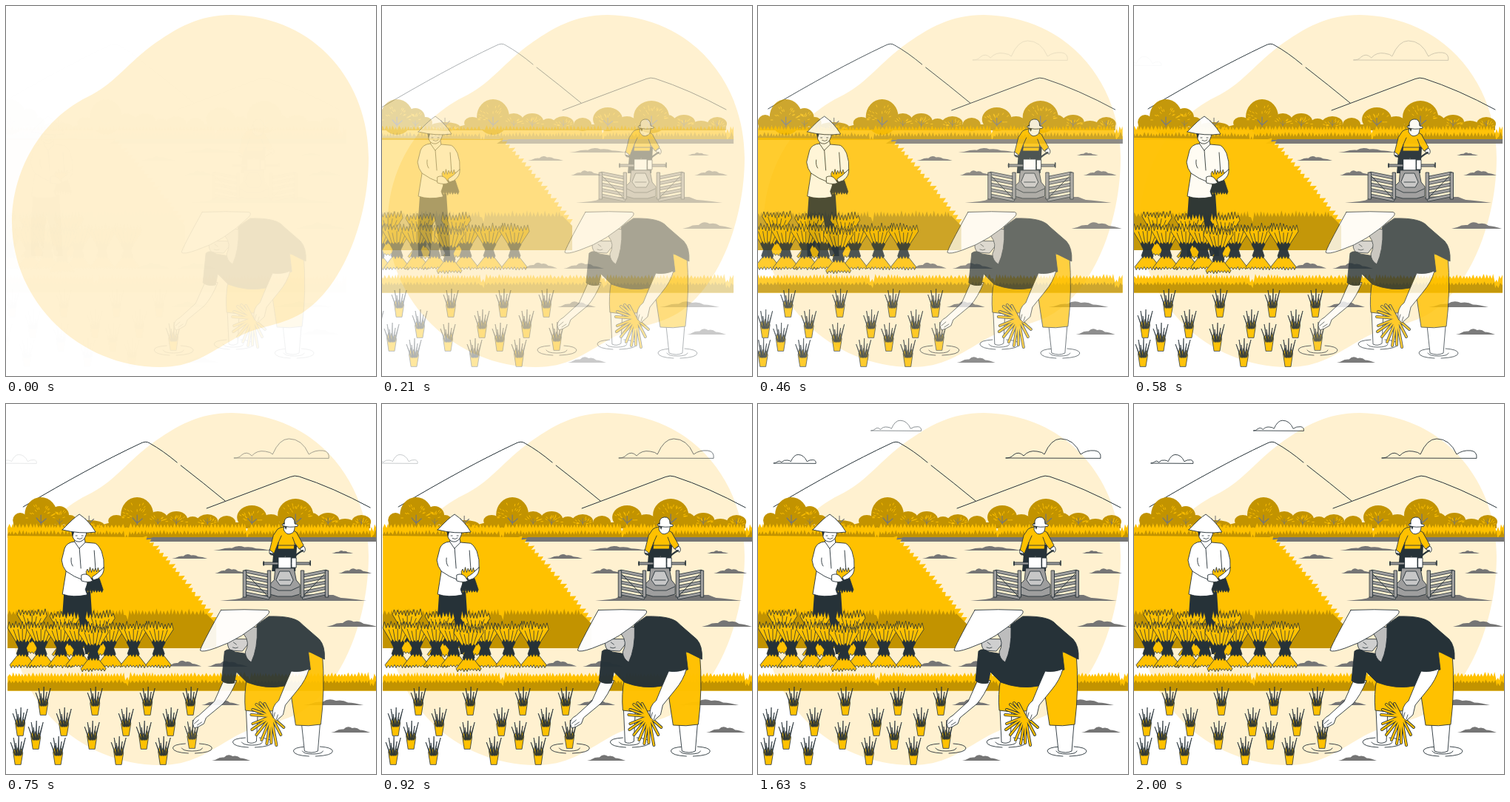
Animation of 500x500 px, one loop 2.04 s. Source, as an HTML page:

```html
<!DOCTYPE html>
<html lang="en">
<head>
<meta charset="utf-8">
<title>Rice field</title>
<style>
html, body { margin: 0; width: 100%; height: 100%; overflow: hidden; background: #fff; }
svg { display: block; width: 100vw; height: 100vh; stroke-linejoin: round; stroke-linecap: round; }
</style>
</head>
<body>
<svg id="stage" viewBox="0 0 500 500"></svg>
<script>
const YELLOW = '#ffc100', BROWN = '#c29300', INK = '#263238', SOIL = '#757575',
      STEEL = '#9e9e9e', CREAM = '#fff1d0', WHITE = '#fff';

let seed = 7;
const rnd = () => (seed = (seed * 16807) % 2147483647) / 2147483647;
const n1 = v => v.toFixed(1);

const shape = (d, fill = 'none', stroke = 'none', w = 0.9) =>
  `<path d="${d}" fill="${fill}" stroke="${stroke}" stroke-width="${w}"/>`;
const line = (d, w = 0.9, color = INK) => shape(d, 'none', color, w);
const oval = (x, y, rx, ry, fill, stroke = 'none') =>
  `<ellipse cx="${x}" cy="${y}" rx="${rx}" ry="${ry}" fill="${fill}" stroke="${stroke}" stroke-width=".9"/>`;
const layer = (move, body) => `<g data-move="${move}" opacity="0">${body}</g>`;

// Horizontal band with a ragged upper edge
function grass(x0, x1, y, bottom, amp, color, tail = '') {
  let d = `M${x0} ${bottom}`;
  for (let x = x0, up = false; x <= x1; x += 1.5 + rnd() * 1.5, up = !up) {
    const notch = [161, 325, 492].some(c => Math.abs(x - c) < 2.5) ? amp : 0;
    d += `L${n1(x)} ${n1(y + (up ? -amp * (0.4 + rnd() * 0.6) : amp * 0.3) + notch)}`;
  }
  return shape(d + `L${x1} ${y}${tail}L${x1} ${bottom}Z`, color);
}

function mound(x0, x1, y, h) {
  const w = x1 - x0, at = (u, v) => `${n1(x0 + w * u)} ${n1(y - h * v)}`;
  return shape(`M${at(0, 0)}Q${at(.1, .1)} ${at(.2, .5)}Q${at(.27, .6)} ${at(.32, .55)}` +
    `Q${at(.42, 1.3)} ${at(.54, .75)}Q${at(.65, .95)} ${at(.74, .45)}Q${at(.85, .4)} ${at(1, 0)}Z`, SOIL);
}

// Trapezoid whose far edge is cut into n spikes
function spikes(cx, y0, w0, y1, w1, n, depth, fill, stroke = INK) {
  let d = `M${cx - w0} ${y0}`;
  for (let i = 0; i <= 2 * n; i++) {
    const x = cx + (i / n - 1) * w1;
    d += `L${n1(x)} ${n1(y1 + (i % 2 ? depth * rnd() * 0.5 : depth * (0.9 + rnd() * 0.3)))}`;
  }
  return shape(d + `L${cx + w0} ${y0}Z`, fill, stroke, 0.8);
}

function sheaf(x, y) {
  let s = spikes(x, y - 4, 6, y - 37, 20, 9, 10, YELLOW) + spikes(x, y + 6, 4, y + 27, 17, 8, -4, YELLOW);
  for (let i = -2; i <= 2; i++) s += line(`M${x + i * 3} ${y - 8}L${x + i * 6} ${y - 22 - rnd() * 5}`, 0.8);
  return s + spikes(x, y, 5, y - 12, 9, 4, 4, INK) + spikes(x, y - 1, 5, y + 12, 8, 4, -4, INK);
}

function seedling(x, y) {
  let s = spikes(x, y, 4, y - 25, 6.5, 3, 8, YELLOW);
  const tips = [[-10, 30], [-6, 36], [-3, 29], [1, 38], [5, 31], [10, 36]];
  for (const [dx, h] of tips)
    s += shape(`M${x + dx * .35 - .6} ${y - 12}L${x + dx} ${y - h}L${x + dx * .4 + .8} ${y - 13}Z`, INK, INK, 0.7);
  return s;
}

const ripple = (x, y) => line(
  `M${x - 9} ${y - 6}Q${x - 26} ${y - 5} ${x - 26} ${y}Q${x - 25} ${y + 6} ${x - 5} ${y + 7}` +
  `M${x + 4} ${y + 7}Q${x + 27} ${y + 6} ${x + 27} ${y}Q${x + 26} ${y - 5} ${x + 10} ${y - 6}` +
  `M${x - 14} ${y}Q${x - 12} ${y + 4} ${x} ${y + 4}Q${x + 13} ${y + 4} ${x + 14} ${y}`);

function mountains() {
  return line('M21 139Q110 86 178 54Q187 49 192 53Q210 63 229 79M234 83Q265 107 294 131', 1) +
    line('M269 141L382 98.500Q388 96 394 98Q440 113 490 140', 1);
}

function trees() {
  const crowns = [[17, 157, 10, 10], [45, 150, 22, 24], [70, 151, 13, 13], [84, 158, 9, 8], [110, 163, 20, 6],
    [147, 158, 11, 8], [175, 150, 22, 24], [203, 155, 13, 10], [228, 156, 15, 11], [250, 160, 10, 8],
    [270, 158, 14, 9], [296, 160, 12, 9], [330, 153, 20, 16], [356, 157, 12, 8], [389, 150, 24, 22],
    [411, 157, 11, 10], [433, 157, 15, 10], [456, 161, 12, 6], [478, 159, 13, 9]];
  let s = shape('M8 161L120 165L140 160L490 160V168H8Z', BROWN), ticks = '';
  for (const [x, y, rx, ry] of crowns) {
    s += oval(x, y, rx, ry, BROWN);
    if (rx < 13) continue;
    for (let i = 0; i < rx * .9; i++) {
      const a = Math.PI * (1 + rnd()), r = .35 + rnd() * .5;
      const c = Math.cos(a), q = Math.sin(a), px = x + c * rx * r, py = y + 4 + q * ry * r;
      ticks += `M${n1(px)} ${n1(py)}l${n1(c * 2.5)} ${n1(q * 2.5)}`;
    }
    const k = rx / 22;
    s += line(`M${x} 163V${n1(163 - 13 * k)}M${x} 161l${n1(-6 * k)} ${n1(-7 * k)}M${x} 161l${n1(7 * k)} ${n1(-6 * k)}`, 1.2 * k, SOIL);
  }
  return s + line(ticks, 0.9, YELLOW);
}

function soil() {
  const heaps = [[278, 356, 198, 6], [222, 270, 209, 6], [438, 467, 202, 4], [447, 492, 229, 7], [280, 322, 229, 7],
    [431, 499, 301, 9], [215, 262, 354.500, 8], [270, 325, 355, 8], [437, 490, 444, 8], [262, 314, 407, 8],
    [400, 481, 407, 8], [276, 328, 482, 8]];
  let s = heaps.map(h => mound(...h)).join('') + shape('M180 186L190 179H500V186Z', SOIL);
  for (let x = 190; x < 470; x += 62) s += mound(x, x + 60, 186, 9);
  return s;
}

function strips() {
  return grass(0, 500, 166, 181, 5, YELLOW) + grass(0, 500, 175, 181, 5, BROWN);
}

function field() {
  let edge = '';
  for (let i = 0; i <= 44; i++) {
    const u = i / 44;
    edge += `L${n1(184 + 96 * u + (i % 2 ? 2 + rnd() * 4 : -1))} ${n1(180 + 114 * Math.pow(u, 1.12) - (i % 2 ? 3 : 0))}`;
  }
  return shape(`M0 178${edge}L282 330H0Z`, YELLOW) + grass(0, 268, 283, 330, 7, BROWN, 'L282 297L282 330');
}

function wheel(x, flip) {
  let s = '';
  for (let i = 0; i < 5; i++) {
    const y = 227 + i * 7.5, a = flip ? 5 : -1, b = flip ? -1 : 5;
    s += line(`M${x + 2} ${y + a}L${x + 32} ${y + b}`, 4.6) + line(`M${x + 2} ${y + a}L${x + 32} ${y + b}`, 3, STEEL);
  }
  for (const px of [x, x + 33]) s += shape(`M${px - 1.5} 225h4v36h-4Z`, STEEL, INK);
  return s + line(flip ? `M${x + 3} 258L${x + 30} 230` : `M${x + 3} 230L${x + 30} 258`, 1);
}

function tractor() {
  return mound(287, 485, 266, 11) + shape('M310 266L322 258H440L460 266Z', SOIL) +
    shape('M360 190H391L389 226H378L375 205L370 226H357Z', INK) +
    shape('M365 169Q372 164 380 168L390 173L400 191L394 196L388 188L387 196H365L366 187L360 202L354 198L359 178Z', YELLOW, INK) +
    line('M366 187L370 178M388 188L385 180M365 191H387') +
    shape('M374 160L373 170Q377 178 383 175Q389 174 388 161Z', WHITE, INK) + shape('M372 161H379L376 170Z', INK) +
    shape('M374 162Q373 154 380 153Q388 152 388 162Q394 163 392 165Q381 168 371 164Q370 162 374 162Z', WHITE, INK) +
    shape('M354 197L359 201Q357 207 354 202Z', WHITE, INK) + shape('M395 196L400 192Q404 196 401 200Z', WHITE, INK) +
    line('M355 202Q360 203 366 212M399 198Q390 202 383 212', 2) +
    shape('M346 214H408V217H346Z', STEEL, INK) + line('M346 213V218M409 212V218', 1.6) +
    shape('M366 207H383V222H366Z', WHITE, INK) + shape('M384 208H390V221H384Z', WHITE, INK) +
    shape('M362 222H387L390 238L395 244V257L384 260H365L354 257V244L360 238Z', STEEL, INK) +
    shape('M368 226H381L386 238L382 245H368L363 238Z', '#c7c7c7', INK) +
    line('M356 247L366 252H383L394 247M367 238H382') +
    wheel(320, false) + wheel(398, true);
}

function reaper() {
  return shape('M76 256L112 254L114 285L117 338H105L95 282L90 338H74L73 300Z', INK) +
    shape('M91 183L90 189L97 196L105 188L104 182Z', WHITE, INK) +
    shape('M87 168L88 180Q91 187 98 186Q106 184 107 171Z', WHITE, INK) +
    shape('M85 169H108L107 174L90 173L88 179Z', INK) +
    line('M92 178h2M100 178h2M94 181.500Q98 184 101 181', .8) +
    shape('M90 186Q80 187 77 195L73 211Q74 220 79 226L74 257Q88 262 107 258L112 226L117 230L130 222Q131 210 127 199Q121 187 116 188L105 187L97 195Z', WHITE, INK) +
    line('M97 195L99 222M86 208Q85 215 88 219M79 226Q90 234 102 238M117 198L119 226') +
    spikes(115, 245, 7, 220, 9, 5, 7, YELLOW) + spikes(117, 236, 7, 257, 12, 7, -6, INK) +
    shape('M100 231Q106 228 111 233L115 239Q109 242 100 239Z', WHITE, INK) +
    shape('M130 221Q131 230 122 236L116 238L114 234L121 229Z', WHITE, INK) +
    shape('M74 170Q89 154 97 149Q110 158 119 173Q98 176 74 170Z', WHITE, INK);
}

function sheaves() {
  const back = [[33, 312], [77, 315], [125, 315]], front = [20, 45, 72, 96, 138, 170, 204];
  return back.map(p => sheaf(...p)).join('') + front.map(x => sheaf(x, 330)).join('') + sheaf(116, 335);
}

function lowerStrip() {
  return grass(0, 500, 367, 387.500, 5, YELLOW) + grass(0, 500, 376, 387.500, 4, BROWN);
}

function seedlings() {
  const rows = [[420, 48, 118, 189, 247], [448, 17, 76, 160, 220], [466, 38, 114, 184], [487, 14, 68, 150, 210]];
  return rows.map(([y, ...xs]) => xs.map(x => seedling(x, y)).join('')).join('');
}

function bunch() {
  const tips = [[341, 406], [346, 404], [352, 405], [336, 413], [334, 420], [336, 432], [335, 440],
    [341, 447], [348, 454], [355, 459], [361, 458], [368, 461], [374, 447], [378, 437]];
  const d = tips.map(([x, y]) => `M361 422L${x} ${y}`).join('');
  return line(d, 4) + line(d, 2.3, YELLOW);
}

function planter() {
  return ripple(254, 465) + ripple(335, 457) + ripple(417, 469) +
    shape('M327 412L329 457Q335 460 341 456L343 412Z', WHITE, INK) +
    shape('M402 432L406 469Q416 473 424 469L427 432Z', WHITE, INK) +
    shape('M328 372Q324 392 326 414Q350 418 372 413L384 372Z', YELLOW, INK) +
    shape('M384 368L394 434Q412 436 428 433Q434 385 430 336L408 335Z', YELLOW, INK) +
    seedling(254, 465) +
    shape('M297 373L284 402L263 421Q255 425 255 432L257 438L263 436L270 432L273 424L296 405Q306 394 314 374Z', WHITE, INK) +
    line('M263 427L257 432M267 430L261 434', .8) +
    shape('M303 318Q300 327 306 333L322 334L335 318Z', '#cfcfcf', INK) +
    shape('M358 287Q394 286 403 298L426 318Q434 327 433 345L411 334L414 359Q402 362 392 363L379 381Q354 386 328 376L314 362L311 377Q300 379 294 374L298 334Q304 329 312 335L330 338L342 298Z', INK, INK) +
    shape('M331 300L342 302Q343 330 334 349Q326 344 326 335Q333 322 324 311Z', '#bdbdbd', INK) +
    line('M310 322l4 3M309 329q4 2 7 0', .8) +
    bunch() +
    shape('M388 361L378 384L371 401Q361 408 363 423L368 428L377 420L380 407L397 386Q408 373 412 358Q400 363 388 361Z', WHITE, INK) +
    line('M366 417L364 424M370 420L368 426', .8) +
    shape('M293 278.500Q325 277 356 278.500Q361 280 355 286Q322 318 285 330Q268 336 265 333Q266 327 293 278.500Z', WHITE, INK);
}

const cloud = (x, y, k) => `<g transform="translate(${x} ${y}) scale(${k})"><path vector-effect="non-scaling-stroke" fill="none" stroke="${INK}" stroke-width=".9" ` +
  'd="M0 0Q7 0 10-4Q17-10 24-3Q31-11 42-9Q50-8 52-5Q61-26 74-26Q92-26 101-5Q109-11 120-10Q129-9 128 0Z"/></g>';

const svg = document.getElementById('stage');
svg.innerHTML =
  shape('M305 12C420 14 490 105 490 205C490 290 455 380 400 415C365 435 345 430 310 449C270 472 250 488 208 488C100 488 8 400 8 292C8 225 45 155 110 123C145 106 160 82 195 55C232 28 262 12 305 12Z', CREAM) +
  layer('scene', mountains()) +
  layer('right', cloud(335, 73, 1)) + layer('left', cloud(23, 80, .445)) + layer('middle', cloud(163, 36, .53)) +
  layer('scene', trees()) + layer('scene', soil() + strips() + shape('M184 186L196 180H500V186Z', SOIL)) +
  layer('scene', field()) + layer('scene', tractor()) + layer('scene', reaper()) +
  layer('scene', sheaves()) + layer('scene', lowerStrip()) + layer('scene', seedlings()) +
  layer('planter', planter());

const LOOP = 2040;
const clamp = u => Math.min(1, Math.max(0, u));
const smooth = (t, start, span) => { const u = clamp((t - start) / span); return u * u * (3 - 2 * u); };

// Slide-in that runs slightly past its mark and settles
const settle = [[0, 0], [165, .29], [330, .6], [455, .81], [580, .95], [665, 1.03], [750, 1.055], [915, 1.03], [1080, 1]];
function overshoot(t) {
  const i = settle.findIndex(([at]) => at > t);
  if (i < 0) return 1;
  const [t0, a] = settle[i - 1], [t1, b] = settle[i];
  return a + (b - a) * (t - t0) / (t1 - t0);
}

const moves = {
  scene: [40, overshoot],
  planter: [30, t => 1 - (1 - clamp((t + 40) / 1120)) ** 2],
  right: [50, t => smooth(t, 250, 1050)],
  left: [44, t => smooth(t, 460, 1330)],
  middle: [25, t => smooth(t, 930, 1250)]
};
const layers = [...svg.querySelectorAll('[data-move]')];
const begin = performance.now();

function draw() {
  const t = (performance.now() - begin) % LOOP;
  for (const g of layers) {
    const [dist, ease] = moves[g.dataset.move], e = ease(t);
    g.setAttribute('transform', `translate(${(dist * (e - 1)).toFixed(2)} 0)`);
    g.setAttribute('opacity', clamp(e).toFixed(3));
  }
  requestAnimationFrame(draw);
}
draw();
</script>
</body>
</html>
```
